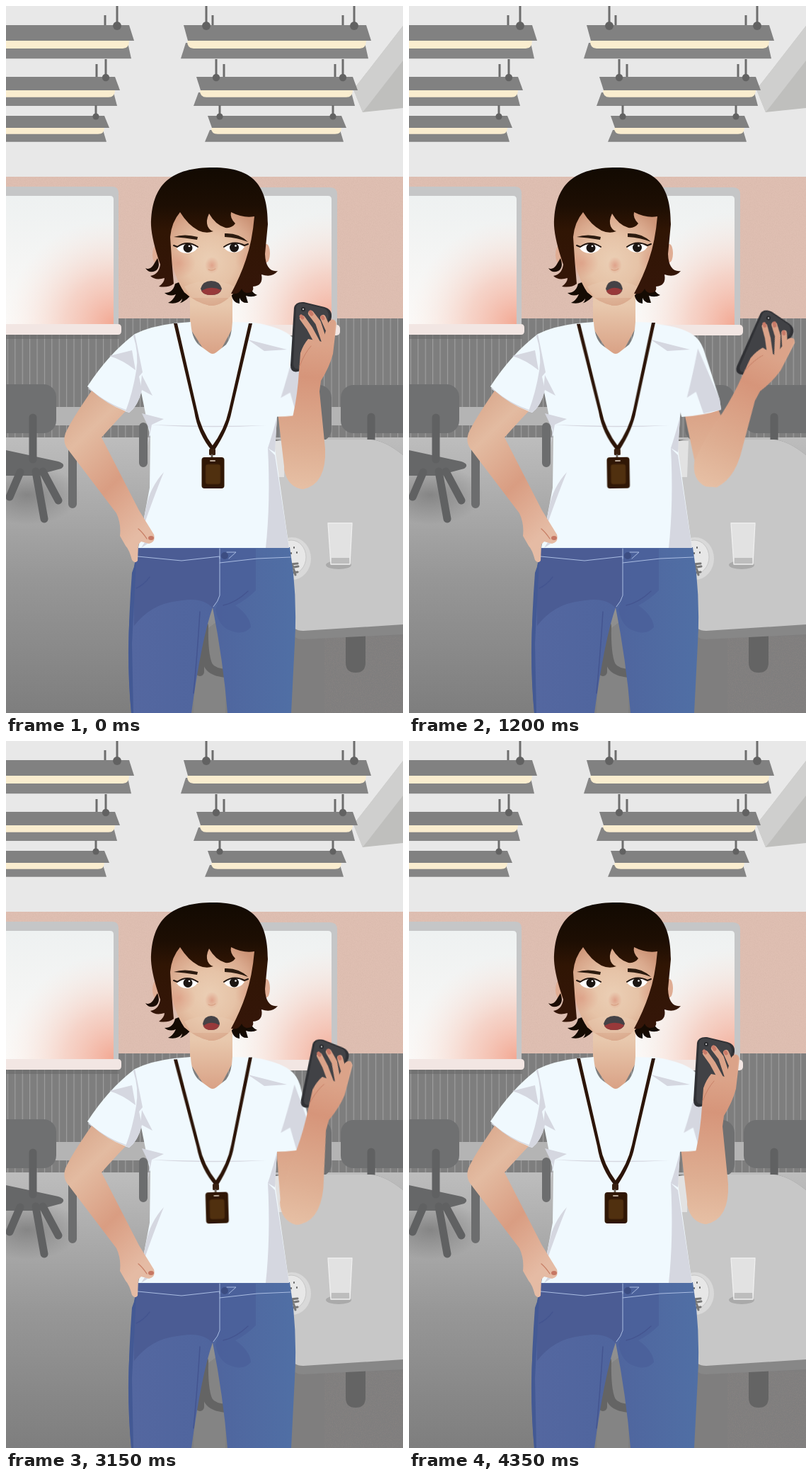
These frames come from a looping animation (561x998 px, 4.5 s). An HTML page:

```html
<!DOCTYPE html>
<html lang="en">
<head>
<meta charset="utf-8">
<title>Phone call in the canteen</title>
<style>
html, body { margin: 0; width: 100%; height: 100%; overflow: hidden; background: #e8e8e8; }
svg { display: block; width: 100%; height: 100%; }
.line { fill: none; stroke-linecap: round; stroke-linejoin: round; }
.forearm, .upper, .sleeve, .lanyard, .mouth, .lids { animation: 4.5s infinite; }
.forearm { animation-name: forearm; transform-origin: 418px 645px; }
.upper { animation-name: upper; transform-origin: 400px 520px; }
.sleeve { animation-name: sleeve; transform-origin: 385px 475px; }
.lanyard { animation-name: lanyard; transform-origin: 292px 450px; }
.mouth { animation-name: mouth; transform-origin: 290px 398px; }
.lids { animation-name: blink; animation-timing-function: step-end; }

/* The picture advances every 150 ms, so each span steps once per tick. */
@keyframes forearm {
  0% { transform: translate(0, 0) rotate(0deg); animation-timing-function: steps(5); }
  16.667% { transform: translate(4px, 0) rotate(14.3deg); animation-timing-function: steps(2); }
  23.333% { transform: translate(9px, -1px) rotate(20.3deg); animation-timing-function: steps(2); }
  30% { transform: translate(15px, -3px) rotate(20.8deg); animation-timing-function: steps(3); }
  40% { transform: translate(19px, -4px) rotate(17.2deg); animation-timing-function: steps(3); }
  50% { transform: translate(15px, -2px) rotate(21.4deg); animation-timing-function: steps(2); }
  56.667% { transform: translate(4px, 0) rotate(17.3deg); animation-timing-function: steps(4); }
  70% { transform: translate(-5px, 1px) rotate(8.2deg); animation-timing-function: steps(3); }
  80% { transform: translate(-3px, 0) rotate(19.6deg); animation-timing-function: steps(5); }
  96.667%, 100% { transform: translate(0, 0) rotate(0deg); }
}
@keyframes upper {
  0% { transform: rotate(0deg); animation-timing-function: steps(5); }
  16.667% { transform: rotate(-1.8deg); animation-timing-function: steps(2); }
  23.333% { transform: rotate(-4deg); animation-timing-function: steps(2); }
  30% { transform: rotate(-6.8deg); animation-timing-function: steps(3); }
  40% { transform: rotate(-8.6deg); animation-timing-function: steps(3); }
  50% { transform: rotate(-6.8deg); animation-timing-function: steps(2); }
  56.667% { transform: rotate(-1.8deg); animation-timing-function: steps(4); }
  70% { transform: rotate(2.3deg); animation-timing-function: steps(3); }
  80% { transform: rotate(1.4deg); animation-timing-function: steps(5); }
  96.667%, 100% { transform: rotate(0deg); }
}
@keyframes sleeve {
  0% { transform: rotate(2deg); animation-timing-function: steps(5); }
  16.667% { transform: rotate(0deg); animation-timing-function: steps(7); }
  40% { transform: rotate(-3deg); animation-timing-function: steps(5); }
  56.667% { transform: rotate(-1deg); animation-timing-function: steps(4); }
  70% { transform: rotate(2deg); animation-timing-function: steps(3); }
  80% { transform: rotate(0deg); animation-timing-function: steps(5); }
  96.667%, 100% { transform: rotate(2deg); }
}
@keyframes lanyard {
  0% { transform: rotate(0deg); animation-timing-function: steps(5); }
  16.667% { transform: rotate(-1.2deg); animation-timing-function: steps(7); }
  40% { transform: rotate(-.5deg); animation-timing-function: steps(5); }
  56.667% { transform: rotate(-.7deg); animation-timing-function: steps(4); }
  70% { transform: rotate(-1.6deg); animation-timing-function: steps(3); }
  80% { transform: rotate(-1.2deg); animation-timing-function: steps(5); }
  96.667%, 100% { transform: rotate(0deg); }
}
@keyframes mouth {
  0%, 40%, 80%, 96.667%, 100% { transform: scaleX(1); animation-timing-function: steps(5); }
  16.667%, 56.667% { transform: scaleX(.75); animation-timing-function: steps(4); }
  30%, 70% { transform: scaleX(.81); animation-timing-function: steps(3); }
}
@keyframes blink {
  0%, 26.667%, 66.667%, 96.667%, 100% { visibility: hidden; }
  13.333%, 53.333%, 93.333% { visibility: visible; }
}
</style>
</head>
<body>
<svg viewBox="0 0 561 998" preserveAspectRatio="none">
<defs>
  <linearGradient id="floor" x1="0" y1="0" x2="0" y2="1"><stop stop-color="#bdbdbd"/><stop offset=".5" stop-color="#979797"/><stop offset="1" stop-color="#7e7e7e"/></linearGradient>
  <linearGradient id="glass" x1="0" y1="0" x2="0" y2="1"><stop stop-color="#eef1f1"/><stop offset="1" stop-color="#fbf9f7"/></linearGradient>
  <radialGradient id="glow" cx="1" cy="1" r="1"><stop stop-color="#f2a48e" stop-opacity=".95"/><stop offset=".45" stop-color="#f4c0b0" stop-opacity=".65"/><stop offset="1" stop-color="#f8e3da" stop-opacity="0"/></radialGradient>
  <linearGradient id="hair" x1="0" y1="0" x2="0" y2="1"><stop stop-color="#120a02"/><stop offset=".3" stop-color="#1d0e03"/><stop offset=".5" stop-color="#301504"/><stop offset="1" stop-color="#351609"/></linearGradient>
  <radialGradient id="face" gradientUnits="userSpaceOnUse" cx="288" cy="360" r="80"><stop stop-color="#ebcfb5"/><stop offset=".45" stop-color="#e6c3a7"/><stop offset=".8" stop-color="#d9a88c"/><stop offset="1" stop-color="#cc9477"/></radialGradient>
  <linearGradient id="chin" x1="0" y1="0" x2="0" y2="1"><stop offset=".6" stop-color="#e9cab0" stop-opacity="0"/><stop offset=".9" stop-color="#e9cab0"/></linearGradient>
  <linearGradient id="neck" x1="0" y1="0" x2="0" y2="1"><stop offset=".2" stop-color="#e8c8ad"/><stop offset="1" stop-color="#d9a185"/></linearGradient>
  <linearGradient id="hip" x1="0" y1="0" x2=".5" y2="1"><stop stop-color="#d6a185"/><stop offset=".3" stop-color="#e3bba1"/><stop offset=".65" stop-color="#d99d82"/><stop offset="1" stop-color="#e5bba4"/></linearGradient>
  <linearGradient id="arm" gradientUnits="userSpaceOnUse" x1="440" y1="440" x2="420" y2="680"><stop stop-color="#e0ae94"/><stop offset=".35" stop-color="#d6957a"/><stop offset=".75" stop-color="#deae92"/><stop offset="1" stop-color="#e6bfa4"/></linearGradient>
  <radialGradient id="blush"><stop stop-color="#d98b74" stop-opacity=".65"/><stop offset="1" stop-color="#d98b74" stop-opacity="0"/></radialGradient>
  <radialGradient id="lid"><stop stop-color="#f0ddc9"/><stop offset=".6" stop-color="#e8ccb3"/><stop offset="1" stop-color="#dcb396"/></radialGradient>
  <radialGradient id="shade"><stop stop-color="#555" stop-opacity=".45"/><stop offset="1" stop-color="#555" stop-opacity="0"/></radialGradient>
  <linearGradient id="denim" x1="0" y1="0" x2="1" y2="0"><stop stop-color="#5467a0"/><stop offset=".5" stop-color="#4f659e"/><stop offset="1" stop-color="#506fa5"/></linearGradient>
  <pattern id="slats" width="10.4" height="20" patternUnits="userSpaceOnUse"><rect width="10.4" height="20" fill="#7e7e7e"/><rect x="2" width="1" height="20" fill="#a3a3a3"/></pattern>
  <filter id="grain" x="0" y="0" width="1" height="1"><feTurbulence type="fractalNoise" baseFrequency=".8" numOctaves="2" seed="4"/><feColorMatrix values="0 0 0 0 .55  0 0 0 0 .38  0 0 0 0 .32  .9 0 0 0 -.35"/><feComposite in2="SourceGraphic" operator="in"/></filter>
  <filter id="soft"><feGaussianBlur stdDeviation=".7"/></filter>
</defs>

<!-- room -->
<rect width="561" height="242" fill="#e8e8e8"/>
<rect y="241" width="561" height="201" fill="#dfbfb2"/>
<rect y="241" width="561" height="201" filter="url(#grain)" opacity=".5"/>
<rect y="441" width="561" height="169" fill="url(#slats)"/>
<rect y="609" width="561" height="389" fill="url(#floor)"/>
<path d="M561 28L491 118 504 150 561 144Z" fill="#bfbfbd"/>
<path d="M561 28L491 118 504 150 561 77Z" fill="#cfcfce"/>

<g id="lights" filter="url(#soft)"></g>

<g id="windows">
  <path d="M0 255H150Q159 255 159 264V452H0Z" fill="#c5c6c7"/>
  <path d="M0 268H147Q152 268 152 273V449H0Z" fill="url(#glass)"/>
  <path d="M30 300H152V449H0V350Z" fill="url(#glow)"/>
  <path d="M0 464H160V470H0Z" fill="#666" opacity=".5"/>
  <path d="M0 449H158Q163 449 163 454V459Q163 464 158 464H0Z" fill="#f2e6e3"/>
  <path d="M320 256H458Q468 256 468 266V452H320Z" fill="#c5c6c7"/>
  <path d="M320 268H455Q460 268 460 273V450H320Z" fill="url(#glass)"/>
  <path d="M320 290H460V450H320Z" fill="url(#glow)"/>
  <rect x="320" y="450" width="152" height="15" rx="5" fill="#f2e6e3"/>
</g>

<!-- furniture -->
<ellipse cx="30" cy="690" rx="75" ry="42" fill="url(#shade)"/>
<path d="M62 566H215V592H62ZM430 566H480V592H430Z" fill="#b4b4b4"/>
<g class="line" stroke="#6c6d6e" stroke-width="12">
  <path d="M94 598V703M194 594V645"/><path d="M110 594V620" stroke-width="10"/>
</g>
<g fill="#6f7071">
  <rect x="-30" y="534" width="101" height="69" rx="18"/>
  <rect x="473" y="535" width="110" height="68" rx="18"/>
  <rect x="390" y="535" width="70" height="80" rx="18"/>
</g>
<path d="M0 627L74 643Q86 647 78 653L40 663H0Z" fill="#666768"/>
<g class="line" stroke="#606162" stroke-width="11">
  <path d="M38 581V640M20 658L5 693M42 657L54 724M52 657L74 698M516 580V612"/>
</g>
<path d="M380 612H515Q535 613 561 636V998H400Z" fill="#7f7e7e"/>
<path d="M450 890H561V998H450Z" filter="url(#grain)" opacity=".3"/>
<path d="M480 885H508V927Q508 941 494 941 480 941 480 927Z" fill="#646464"/>
<path d="M375 620Q380 612 395 612H515Q535 613 561 634V887L420 894Q405 894 400 880Z" fill="#878787"/>
<path d="M375 620Q380 612 395 612H515Q535 613 561 634V873L420 882Q405 882 400 868Z" fill="#c7c7c7"/>
<path d="M376 614H395L393 665H378Z" fill="#e2e2e2"/>
<ellipse cx="470" cy="789" rx="18" ry="6" fill="#aaa"/>
<path d="M455 730H489L486 788H459Z" fill="#e2e2e2"/>
<path d="M460 779H485L486 788H459Z" fill="#bdbdbd"/>
<path class="line" d="M455 730H489L486 788H459Z" stroke="#efefef" stroke-width="1.3"/>
<ellipse cx="404" cy="780" rx="27" ry="30" fill="#d9d9d9"/>
<ellipse cx="403" cy="778" rx="21" ry="24" fill="#e7e7e7" stroke="#c6c6c6"/>
<path class="line" d="M402 788L412 787M402 793L413 791M402 800L412 799M405 790L409 803" stroke="#777" stroke-width="3"/>
<path class="line" d="M407 764V765M411 771V772M403 772V773" stroke="#666" stroke-width="2"/>
<path d="M270 890L310 860V998H265Z" fill="#848484"/>
<path class="line" d="M280 875Q279 915 286 931 292 941 312 942M274 918V940" stroke="#646464" stroke-width="12"/>

<!-- jeans -->
<path d="M185 764H401L406 800Q411 850 408 900L403 998H313Q307 925 292 849 276 895 262 998H177Q170 920 175 860L180 800Z" fill="url(#denim)"/>
<path d="M185 766H302V835L292 850Q278 833 242 840 205 844 181 875L180 800Z" fill="#4b5c94"/>
<path d="M302 766H353V825Q340 838 324 846 345 861 346 877 335 889 318 882 301 877 296 852L302 835Z" fill="#4a609a" opacity=".8"/>
<path d="M178 800L184 783 178 900 180 998H177Q169 920 178 800Z" fill="#435994"/>
<g class="line" stroke="#445590" stroke-width="1.5"><path d="M184 822Q195 817 203 806M274 855Q270 920 265 970M307 846Q325 842 342 826"/></g>
<path class="line" d="M186 777L248 783 302 777V832Q300 840 293 848M302 786L355 780 402 778M302 766V780M312 771L325 771 315 780" stroke="#a9bce2" stroke-width="1"/>
<circle cx="309" cy="776" r="5" fill="#3c4d82"/>

<!-- neck and shirt -->
<path d="M260 405H320V455L300 492H284L260 455Z" fill="url(#neck)"/>
<g class="upper"><path d="M383 565H430L450 632Q451 668 420 682 400 680 394 658Z" fill="url(#arm)"/></g>
<g class="sleeve">
  <path d="M340 447Q382 451 401 464 411 471 416 485L437 556 439 571Q414 579 383 580L365 520Z" fill="#f0f9fe"/>
  <path d="M408 484L437 556 439 571 414 576 404 545 391 553Q399 525 408 484Z" fill="#d5d7e0"/>
</g>
<path d="M237 448L261 446Q262 468 272 478L287 489Q292 493 297 489L311 478Q319 468 320 446L348 447 395 470 383 580 380 625 400 765H187L203 680 204 610 191 545Q186 565 174 574 142 565 115 537 145 491 182 463 204 452 237 448Z" fill="#f0f9fe"/>
<g fill="#d5d7e0">
  <path d="M370 624L380 634 400 765H367Q374 700 370 624ZM383 580L380 630 370 624Q376 606 383 580Z"/>
  <path d="M180 466Q188 490 184 515 179 546 169 572L174 574Q187 564 192 542L188 523 193 517Q187 487 182 463Z"/>
  <path d="M178 486L146 494Q164 499 183 514ZM192 521L207 550 190 541ZM192 575L203 598 200 621 206 591 223 583Z"/>
  <path d="M223 658Q203 680 198 708L190 747Q209 692 223 658ZM342 471L397 485 365 487Z"/>
  <path d="M204 591Q294 594 368 592 288 597 204 591ZM191 765L206 755 196 757Z"/>
</g>
<path class="line" d="M117 540Q143 563 174 572" stroke="#d5d7e0" stroke-width="1.2"/>

<!-- arm on the hip -->
<path d="M121 543Q142 562 169 572 150 592 135 609L188 712 209 746Q212 757 202 759L191 756 187 760 186 783Q182 788 178 782 174 767 169 762L161 748Q163 731 156 716L86 624Q80 615 84 603 92 585 121 543Z" fill="url(#hip)"/>
<path class="line" d="M187 738Q193 743 199 752" stroke="#c88067" stroke-width="1.3"/>
<ellipse cx="205" cy="751" rx="4" ry="3" fill="#c67763"/>

<g class="lanyard">
  <path d="M237 448H242L270 570Q275 598 293 622L291 628Q271 604 266 572Z" fill="#2c1508"/>
  <path d="M343 448H348L319 572Q314 598 294 628L290 623Q309 598 315 570Z" fill="#2c1508"/>
  <rect x="287" y="625" width="9" height="9" rx="1.5" fill="#39200f"/>
  <path class="line" d="M291 634V639" stroke="#6a6058" stroke-width="3"/>
  <rect x="276.500" y="637" width="32" height="44" rx="4" fill="#301705"/>
  <rect x="282" y="647" width="21" height="28" rx="3" fill="#50300f" stroke="#40220a"/>
  <rect x="288" y="641" width="8" height="2" rx="1" fill="#b9a798"/>
</g>

<!-- head -->
<path d="M239 392Q236 405 224 405 231 411 240 407 236 416 229 419 243 422 249 413 248 419 244 420 257 416 263 405L255 386ZM326 388L318 405Q320 419 330 420L330 412Q333 420 342 419L339 409Q348 412 355 408 344 404 345 388Z" fill="#150b03"/>
<ellipse cx="213" cy="351" rx="6" ry="13" fill="#e0ad94"/><ellipse cx="368" cy="349" rx="5" ry="13" fill="#e0ad94"/>
<path d="M214 356Q219 369 211 374 202 378 197 370 203 373 208 366Z" fill="#1b0d04"/>
<g id="skin">
  <path id="jaw" d="M227 290H352L350 343Q344 378 322 405 304 424 288 423 267 418 252 404 237 382 230 340Z" fill="url(#face)"/>
  <use href="#jaw" style="fill:url(#chin)"/>
  <path d="M252 396Q288 380 323 396L318 412H262Z" fill="#e9cab0" opacity=".5" filter="url(#soft)"/>
</g>
<ellipse cx="244" cy="363" rx="24" ry="21" fill="url(#blush)" opacity=".75"/>
<ellipse cx="341" cy="357" rx="17" ry="20" fill="url(#blush)" opacity=".5"/>
<ellipse cx="291" cy="366" rx="10" ry="12" fill="url(#blush)"/>
<path class="line" d="M286 372Q291 375 296 371" stroke="#d59a7c" stroke-width="1"/>
<path d="M237 326Q252 321 271 326L270 330Q252 327 237 326ZM309 321Q329 320 342 333 327 327 309 326Z" fill="#2c1b0f"/>

<g id="eyes">
  <path d="M241 342Q256 329 271 341 266 349 255 349 246 349 241 342ZM308 341Q322 329 337 340 332 348 322 348 313 348 308 341Z" fill="#fff"/>
  <circle cx="257" cy="341.500" r="6.500" fill="#1b1512"/><circle cx="322.500" cy="341" r="6.500" fill="#1b1512"/>
  <circle cx="259" cy="339" r="1.300" fill="#fff"/><circle cx="324.500" cy="338.500" r="1.300" fill="#fff"/>
  <path class="line" d="M237 338L242 340Q256 330 271 340M308 340Q322 330 337 338L342 336" stroke="#221610" stroke-width="2"/>
</g>
<g class="lids">
  <ellipse cx="255.500" cy="341" rx="18" ry="9.500" fill="url(#lid)"/><ellipse cx="323" cy="341" rx="18" ry="9.500" fill="url(#lid)"/>
  <path class="line" d="M237 338Q249 334 269 341M309 341Q324 334 341 336" stroke="#c99b7c" stroke-width="1.2"/>
</g>

<g class="mouth">
  <path d="M275 399Q278 388 290 388 302 388 305 399 303 408 290 408 277 408 275 399Z" fill="#454246"/>
  <path d="M276 402Q290 394 304 401 301 408 290 408 279 408 276 402Z" fill="#98393a"/>
</g>

<path d="M205 310C205 250 235 228 293 228C350 228 370 254 370 308L366 350Q367 376 384 374 376 384 361 379 364 395 349 396 351 405 340 405 335 404 333 399 329 408 318 406 331 382 339 358 348 332 351 297 336 300 318 291 316 299 324 307 319 314 310 313 296 309 287 293 282 303 285 311 288 317 293 318 283 322 272 317 257 309 246 291 234 305 232 326 234 360 237 392 230 398 216 396 224 390 224 384 211 388 204 381 216 379 218 365 206 330 205 310Z" fill="url(#hair)"/>

<!-- raised arm -->
<g class="forearm">
  <path d="M407 426Q409 417 421 418L450 425Q461 428 460 439L451 480 416 515Q402 520 402 507Z" fill="#303135"/>
  <path d="M410 425Q412 419 421 420L450 427Q456 430 456 438L446 480 416 512Q406 514 406 505Z" fill="#414246"/>
  <circle cx="420" cy="428" r="3" fill="#27282b"/><circle cx="420" cy="428" r="1.200" fill="#b7b7b8"/>
  <path d="M416 490Q420 478 427 470L447 474 456 446Q464 438 467 448L462 491Q457 510 445 529L443 544 451 625Q453 675 420 682 398 679 393 654 396 610 406 576 412 548 414 516Z" fill="url(#arm)"/>
  <g class="line" stroke="#dba389" stroke-width="8">
    <path d="M419 441L429 455 441 477M431 434L441 447 450 474M448 440L456 458 454 476M461 447L459 471"/>
  </g>
  <g class="line" stroke="#c97a68" stroke-width="5"><path d="M417 438L419 440M430 432L432 435M447 439L448 441"/></g>
  <path class="line" d="M415 508Q422 490 431 480" stroke="#c88168" stroke-width="1"/>
</g>
</svg>

<script>
const lights = document.getElementById('lights');

// Lamp: left and right edge, top, panel height, hanging rods from rodTop, thin rods
function lamp(left, right, top, height, rodTop, rods, thin) {
  const mid = top + height, end = mid + height * 1.1, tube = height * .46;
  const rod = (x, y, width) => `<path d="M${x} ${y}V${top}" stroke="#6d6d6d" stroke-width="${width}"/>`;
  const knob = x => `<circle cx="${x}" cy="${top + 1}" r="${height * .27}" fill="#626262"/>`;
  lights.innerHTML += rods.map(x => rod(x, rodTop, 3)).join('')
    + thin.map(x => rod(x, Math.max(13, top - 18), 3)).join('')
    + `<path d="M${left + 3} ${mid + 3}H${right - 9}L${right - 4} ${end + 1}H${left - 4}Z" fill="#858585"/>
       <path d="M${left + 5} ${mid}H${right - 7}Q${right - 7} ${mid + tube + 1} ${right - 16} ${mid + tube + 1}H${left + 14}Q${left + 5} ${mid + tube + 1} ${left + 5} ${mid}Z" fill="#faedcf"/>
       <path d="M${left} ${top}H${right - 7}L${right} ${mid}H${left + 6}Z" fill="#818181"/>`
    + rods.map(knob).join('');
}
lamp(-60, 181, 27, 22, 0, [157], [140]);
lamp(-60, 161, 100, 19, 75, [141], [128]);
lamp(-60, 146, 155, 17, 140, [127], []);
lamp(251, 516, 27, 22, 0, [283, 492], [292, 476]);
lamp(269, 497, 100, 19, 75, [297, 476], [308, 465]);
lamp(285, 481, 155, 17, 140, [302, 462], []);
</script>
</body>
</html>
```
